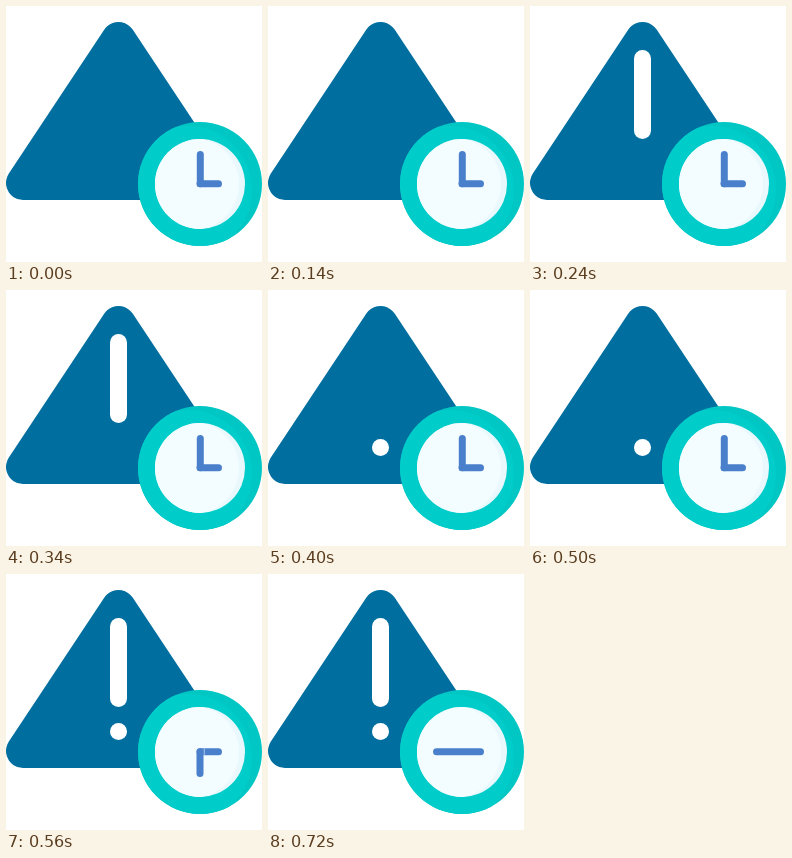
Animation of 256x256 px, one loop 0.8 s. Source, as an HTML page:

```html
<!DOCTYPE html>
<html lang="en">
<head>
<meta charset="utf-8">
<title>Time warning</title>
<style>
  html, body { margin: 0; width: 100%; height: 100%; overflow: hidden; background: #fff; }
  svg { display: block; width: 100vw; height: 100vh; }
  .sign { fill: #006f9f; stroke: #006f9f; stroke-width: 34; stroke-linejoin: round; }
  .mark { stroke: #fff; stroke-width: 17; stroke-linecap: round; }
  .hand { fill: none; stroke: #4a80cb; stroke-width: 7; stroke-linecap: round; stroke-linejoin: round; }
  .seam { stroke: #a9c4ea; stroke-width: 1; }
  .bar, .dot, .up, .down, .side, .dash { animation: 800ms step-end infinite; }
  .bar { animation-name: bar; }
  .dot { animation-name: dot; }
  .up { animation-name: up; }
  .down { animation-name: down; }
  .side { animation-name: side; }
  .dash { animation-name: dash; }
  @keyframes bar { 0%, 50% { opacity: 0 } 30%, 70%, 100% { opacity: 1 } }
  @keyframes dot { 0% { opacity: 0 } 50%, 100% { opacity: 1 } }
  @keyframes up { 0% { opacity: 1 } 70%, 100% { opacity: 0 } }
  @keyframes down { 0%, 90%, 100% { opacity: 0 } 70% { opacity: 1 } }
  @keyframes side { 0% { opacity: 1 } 90%, 100% { opacity: 0 } }
  @keyframes dash { 0% { opacity: 0 } 90%, 100% { opacity: 1 } }
</style>
</head>
<body>
<svg viewBox="0 0 256 256">
  <defs>
    <clipPath id="rim"><circle cx="194" cy="178" r="62"/></clipPath>
    <clipPath id="face"><circle cx="194" cy="178" r="45"/></clipPath>
  </defs>

  <path class="sign" d="M112.5 33 L17 177 H208 Z"/>
  <path class="mark bar" d="M112.5 52.5 V124.5"/>
  <path class="mark dot" d="M112.5 157.5 h.01"/>

  <circle cx="194" cy="178" r="62" fill="#00c6c4"/>
  <circle cx="182" cy="184" r="64" fill="#00cdca" clip-path="url(#rim)"/>
  <circle cx="194" cy="178" r="45" fill="#e9f8fd"/>
  <circle cx="187" cy="178" r="46" fill="#f3fcff" clip-path="url(#face)"/>

  <path class="hand side" d="M194 177.8 H212.5"/>
  <path class="hand up" d="M194.3 148.5 V177.8"/>
  <g class="down">
    <path class="hand" d="M194 177.8 V199.5"/>
    <path class="seam" d="M198.3 174.3 V181.3"/>
  </g>
  <path class="hand dash" d="M168.5 177.8 H212.5"/>
</svg>
</body>
</html>
```
